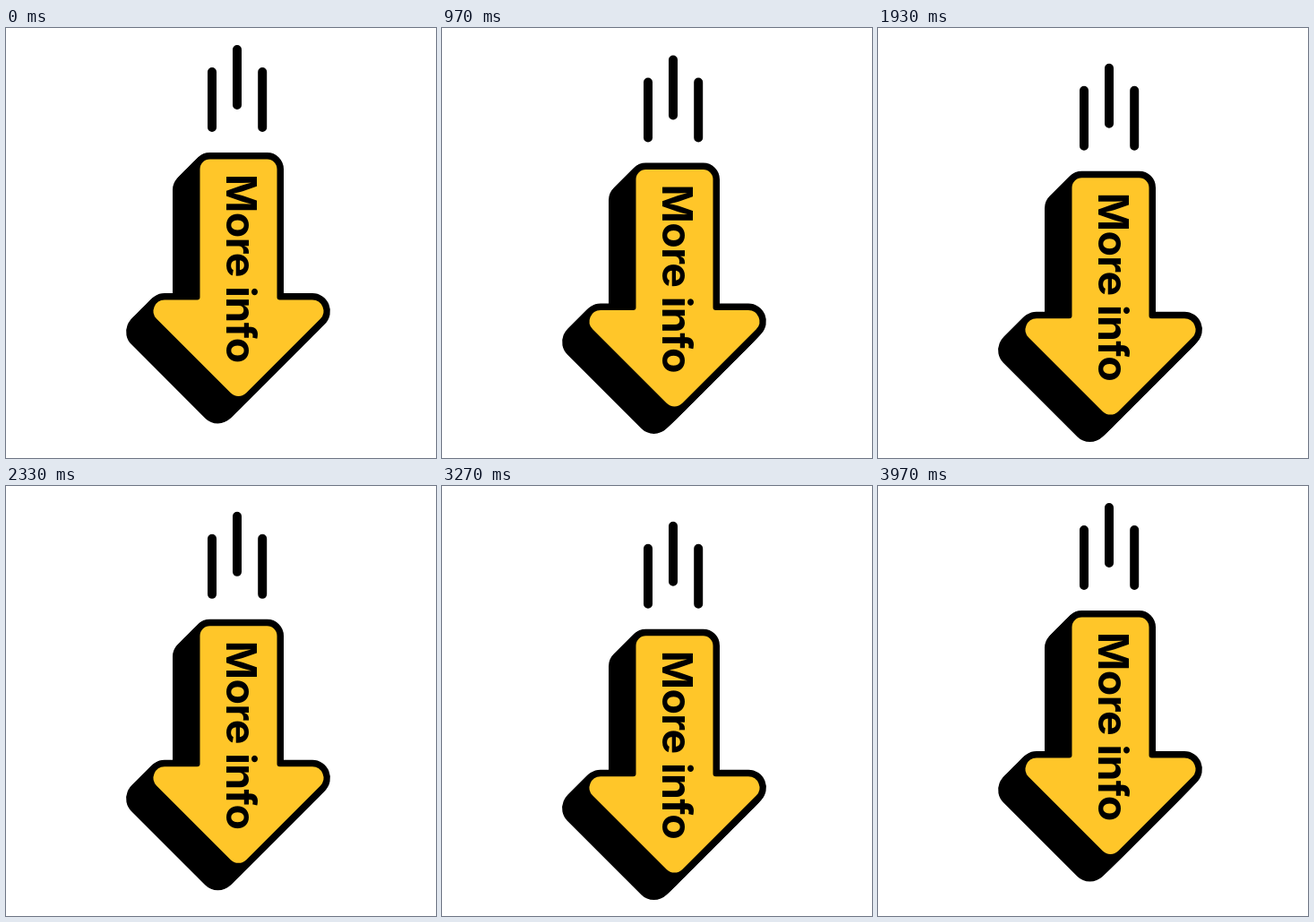
These frames come from a looping animation (480x480 px, 4.01 s). An HTML page:

```html
<!DOCTYPE html>
<html lang="en">
<head>
<meta charset="utf-8">
<title>More info</title>
<style>
  html, body { margin: 0; width: 100%; height: 100%; overflow: hidden; background: #fff; }
  svg { display: block; width: 100%; height: 100%; }
  .edge { stroke: #000; stroke-width: 15; stroke-linejoin: round; }
  .dash { fill: none; stroke: #000; stroke-width: 10; stroke-linecap: round; }
  text {
    font: 700 46.5px Inter, "Liberation Sans", Arial, sans-serif;
    font-optical-sizing: none;
    letter-spacing: -.6px;
  }
</style>
</head>
<body>
<svg viewBox="0 0 480 480">
  <defs>
    <path id="arrow" d="M227.5 146.5H291.5a11 11 0 0 1 11 11V300.5a3 3 0 0 0 3 3H342
      A12.5 12.5 0 0 1 350.8 324.8L268.3 407.3A12.5 12.5 0 0 1 250.7 407.3
      L168.2 324.8A12.5 12.5 0 0 1 177 303.5H213.5a3 3 0 0 0 3-3V157.5a11 11 0 0 1 11-11Z"/>
  </defs>
  <g id="mover">
    <path class="dash" d="M230 49V111M258 24V86M286.2 49V111"/>
    <g id="depth" class="edge"></g>
    <use href="#arrow" fill="#ffc629"/>
    <text transform="translate(245.5 163) rotate(90)">More info</text>
  </g>
</svg>
<script>
  const LOOP = 4010, FPS = 30, FRAMES = 120, CYCLE = 40, DROP = 21, LEAD = 0.4;
  const mover = document.getElementById('mover');
  const depth = document.getElementById('depth');

  // Sweep the outline down-left to build the solid side of the arrow.
  for (let d = 0; d <= 23; d++) {
    const copy = document.createElementNS('http://www.w3.org/2000/svg', 'use');
    copy.setAttribute('href', '#arrow');
    copy.setAttribute('transform', `translate(${-d} ${d})`);
    depth.append(copy);
  }

  function draw(now) {
    const t = now % LOOP;
    const frame = Math.min(FRAMES - 1, Math.floor((t + 4) * FPS / 1000));
    const angle = (frame + LEAD) / CYCLE * 2 * Math.PI;
    const y = DROP * (1 - Math.cos(angle)) / 2;
    mover.setAttribute('transform', `translate(0 ${y.toFixed(2)})`);
    requestAnimationFrame(draw);
  }
  draw(performance.now());
</script>
</body>
</html>
```
